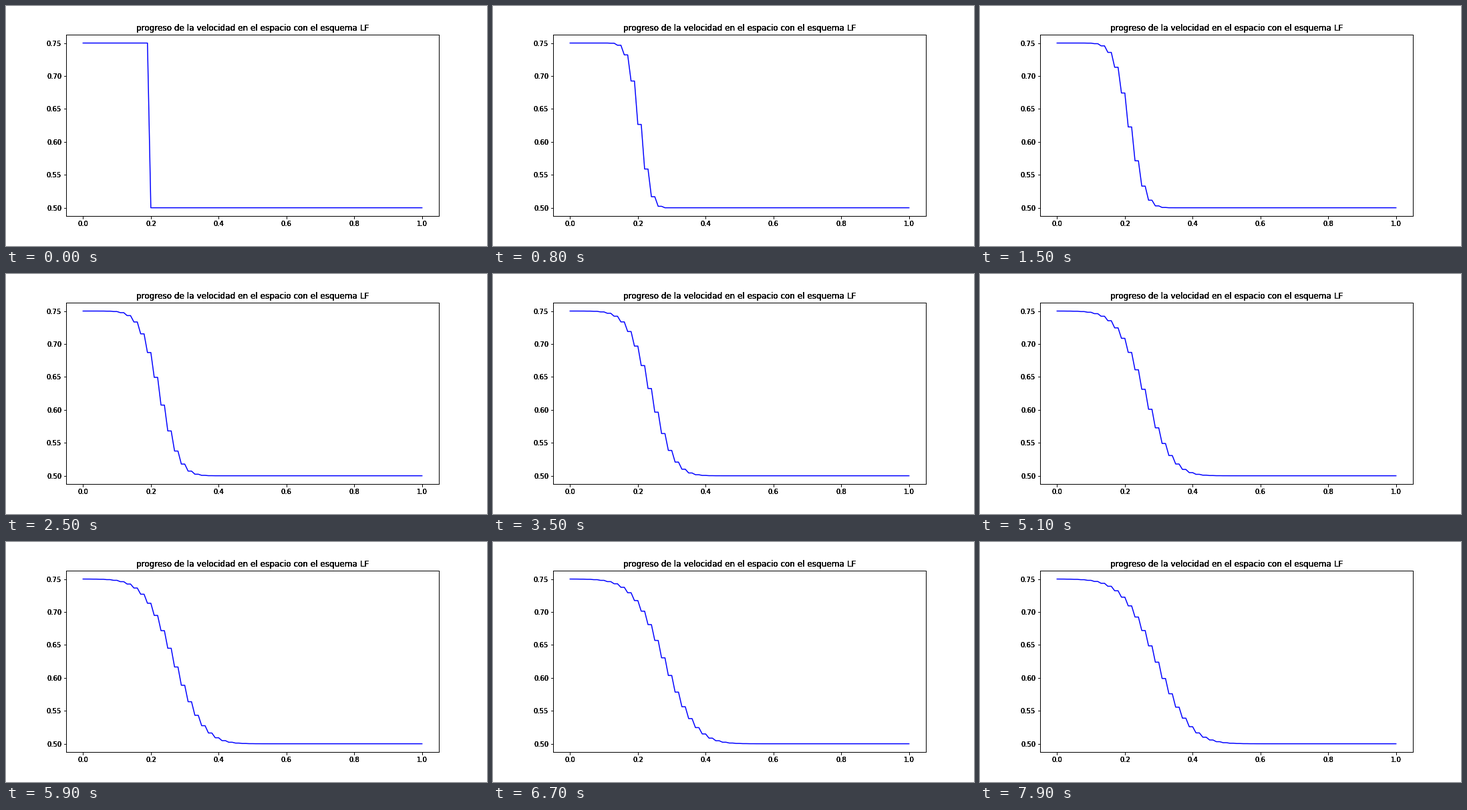
Recreate the animation shown at these times as a matplotlib script. Size 720 by 360 pixels, loop 8 s.

```python
import numpy as np
import matplotlib.pyplot as plt
from matplotlib.animation import FuncAnimation

plt.rcParams.update({"font.family": "DejaVu Sans", "font.size": 10})

FRAMES, INTERVAL = 80, 100
DX, DT = 0.01, 0.002
LAYERS = 4  # stacked copies of the frame and labels give the heavy, dark text

x = np.linspace(0, 1, 101)


def step(u):
    """One Lax-Friedrichs step of the inviscid Burgers equation."""
    flux = u**2 / 2
    new = u.copy()
    new[1:-1] = (u[2:] + u[:-2]) / 2 - DT / (2 * DX) * (flux[2:] - flux[:-2])
    return new


def solve():
    states = [np.where(np.arange(x.size) < 20, 0.75, 0.5)]
    while len(states) < FRAMES:
        states.append(step(states[-1]))
    return states


def add_layer(fig, face):
    ax = fig.add_axes([0.125, 0.125, 0.775, 0.755], facecolor=face)
    ax.set(xlim=(-0.05, 1.05), ylim=(0.4875, 0.7625))
    ax.set_title("progreso de la velocidad en el espacio con el esquema LF",
                 fontsize=12)
    return ax


states = solve()
fig = plt.figure(figsize=(10, 5), dpi=72, facecolor="white")
layers = [add_layer(fig, "none" if i else "white") for i in range(LAYERS)]
line, = layers[0].plot(x, states[0], color="blue", lw=1.5)


def update(n):
    line.set_ydata(states[n])
    return line,


anim = FuncAnimation(fig, update, frames=FRAMES, interval=INTERVAL,
                     repeat=True, repeat_delay=0)
plt.show()
```
